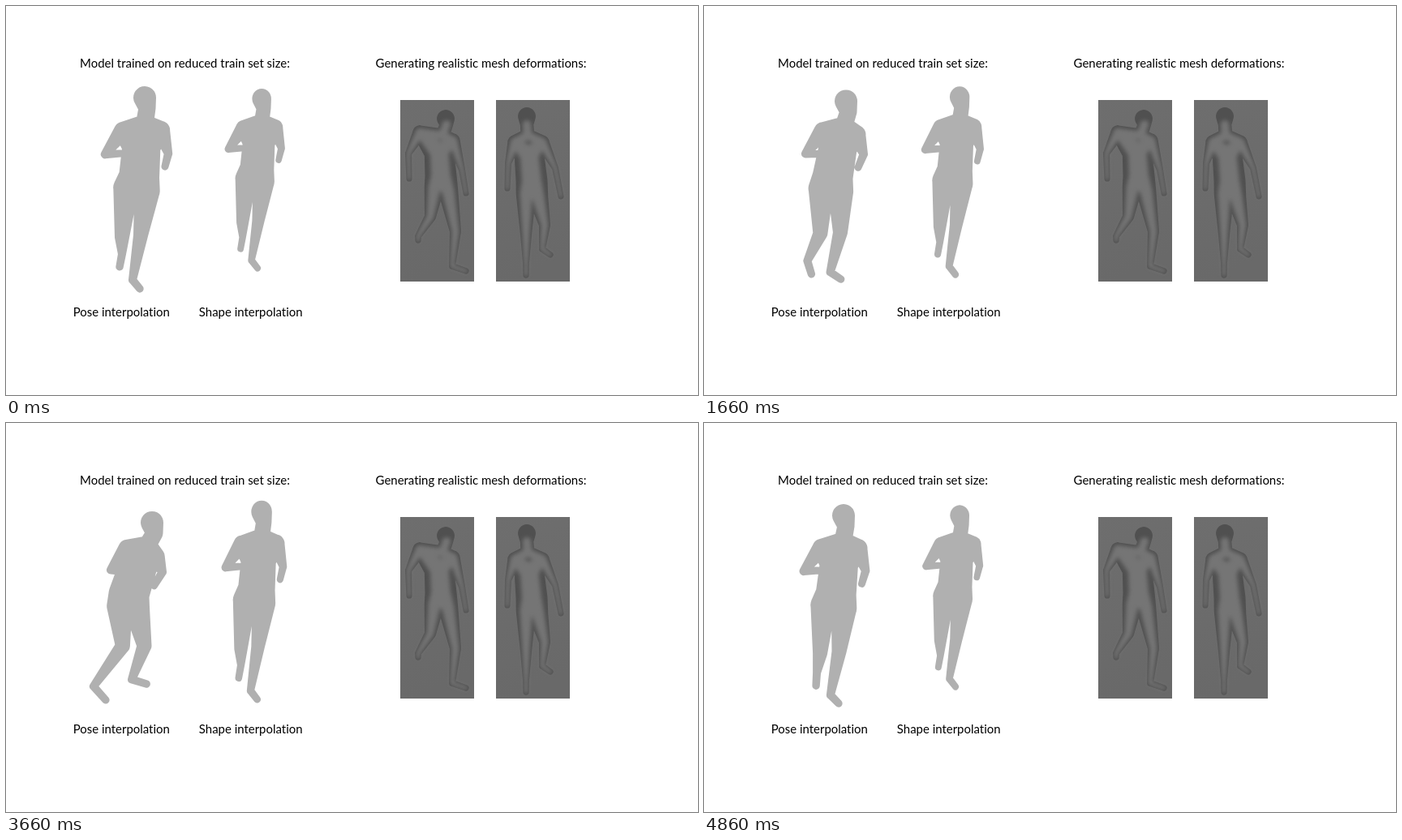
Recreate the animation shown at these times as an HTML page. Size 853 px wide and 480 px high, loop 5060 ms.

```html
<!DOCTYPE html>
<html lang="en">
<head>
<meta charset="utf-8">
<title>Mesh interpolation</title>
<style>
html, body { margin: 0; width: 100%; height: 100%; overflow: hidden; background: #fff; }
svg { display: block; width: 100vw; height: 100vh; }
text { font: 14.95px Lato, sans-serif; font-variant-ligatures: none; text-anchor: middle; }
.runner { fill: #b0b0b0; }
.skin { fill: #505050; }
.light { fill: #7c7c7c; opacity: 0.85; filter: url(#soft); }
</style>
</head>
<body>
<svg viewBox="0 0 853 480">
  <defs>
    <linearGradient id="wall" x2="0.2" y2="1">
      <stop offset="0" stop-color="#6e6e6e"/>
      <stop offset="1" stop-color="#696969"/>
    </linearGradient>
    <filter id="soft"><feGaussianBlur stdDeviation="2.5"/></filter>
  </defs>

  <text x="220.5" y="76">Model trained on reduced train set size:</text>
  <text x="585.5" y="76">Generating realistic mesh deformations:</text>
  <text x="142.3" y="383">Pose interpolation</text>
  <text x="301.7" y="383">Shape interpolation</text>

  <path id="pose" class="runner"/>
  <path id="shape" class="runner"/>

  <rect x="486" y="116" width="91" height="224" fill="url(#wall)"/>
  <path id="stepSkin" class="skin"/>
  <path id="stepLight" class="light"/>

  <rect x="604" y="116" width="91" height="224" fill="url(#wall)"/>
  <path id="leanSkin" class="skin"/>
  <path id="leanLight" class="light"/>
</svg>
<script>
// One body rig serves all four figures: joints with radii, joined by tapered limbs.
const radius = {
  crown: 14, chin: 10.5, neck: 11, chest: 23.5, belly: 25,
  shoulder: 11, elbow: 5.2, hand: 4.5, hip: 15.7, knee: 9, ankle: 5, toe: 4.7
};
const trunk = ['chin neck', 'chest belly'];
const head = ['crown chin'];
for (const s of 'LR') {
  trunk.push(`neck shoulder${s}`, `shoulder${s} chest`, `belly hip${s}`,
    `shoulder${s} elbow${s}`, `elbow${s} hand${s}`,
    `hip${s} knee${s}`, `knee${s} ankle${s}`, `ankle${s} toe${s}`);
}

const running = {
  crown: [171, 113], chin: [174, 126], neck: [171, 145], chest: [167, 172], belly: [164, 212],
  shoulderL: [144, 154], elbowL: [122, 183], handL: [141, 182],
  shoulderR: [191, 153], elbowR: [200, 182], handR: [196, 198],
  hipL: [148, 224], kneeL: [143, 285], ankleL: [143, 306], toeL: [140, 322],
  hipR: [174, 228], kneeR: [166, 283], ankleR: [156, 338], toeR: [165, 349]
};
const crouching = {
  crown: [181, 124], chin: [184, 137], neck: [175, 151], chest: [163, 175], belly: [150, 212],
  shoulderL: [150, 155], elbowL: [130, 181], handL: [140, 183],
  shoulderR: [184, 166], elbowR: [192, 184], handR: [181, 201],
  hipL: [139, 226], kneeL: [144, 274], ankleL: [104, 327], toeL: [121, 344],
  hipR: [160, 230], kneeR: [171, 274], ankleR: [155, 314], toeR: [174, 319]
};
const stepping = {
  crown: [542, 139], chin: [543, 146], neck: [538, 160], chest: [534, 180], belly: [536, 210],
  shoulderL: [510, 156], elbowL: [496, 182], handL: [497, 213],
  shoulderR: [551, 166], elbowR: [562, 202], handR: [567, 231],
  hipL: [528, 224], kneeL: [523, 260], ankleL: [508, 284], toeL: [508, 289],
  hipR: [545, 228], kneeR: [554, 278], ankleR: [550, 321], toeR: [567, 327]
};
const leaning = {
  crown: [642, 136], chin: [642, 146], neck: [643, 160], chest: [645, 184], belly: [648, 216],
  shoulderL: [627, 168], elbowL: [619, 194], handL: [618, 225],
  shoulderR: [661, 168], elbowR: [677, 200], handR: [684, 235],
  hipL: [641, 232], kneeL: [641, 282], ankleL: [641, 318], toeL: [641, 332],
  hipR: [656, 236], kneeR: [664, 270], ankleR: [661, 300], toeR: [671, 307]
};

const mix = (a, b, u) => a + (b - a) * u;
const setPath = (id, d) => document.getElementById(id).setAttribute('d', d);

// Outline around two circles, the outer tangents joining them.
function limb([x1, y1], r1, [x2, y2], r2) {
  const dir = Math.atan2(y2 - y1, x2 - x1);
  const taper = (r1 - r2) / Math.hypot(x2 - x1, y2 - y1);
  const spread = Math.acos(Math.max(-0.99, Math.min(0.99, taper)));
  const rim = (x, y, r, a) => `${(x + r * Math.cos(a)).toFixed(2)} ${(y + r * Math.sin(a)).toFixed(2)}`;
  const wide = spread < Math.PI / 2 ? 1 : 0;
  return `M${rim(x1, y1, r1, dir + spread)}`
    + `A${r1} ${r1} 0 ${wide} 1 ${rim(x1, y1, r1, dir - spread)}`
    + `L${rim(x2, y2, r2, dir - spread)}`
    + `A${r2} ${r2} 0 ${1 - wide} 1 ${rim(x2, y2, r2, dir + spread)}Z`;
}

function body(joints, bones, scale = 1) {
  const size = name => radius[name.replace(/[LR]$/, '')] * scale;
  return bones.map(bone => {
    const [a, b] = bone.split(' ');
    return limb(joints[a], size(a), joints[b], size(b));
  }).join('');
}

const blend = (from, to, u) => Object.fromEntries(Object.keys(from).map(
  name => [name, from[name].map((v, i) => mix(v, to[name][i], u))]));

const everyBone = [...head, ...trunk];
const MESH = 0.78, CORE = 0.48;
for (const [name, joints] of [['step', stepping], ['lean', leaning]]) {
  setPath(name + 'Skin', body(joints, everyBone, MESH));
  setPath(name + 'Light', body(joints, trunk, CORE));
}
setPath('shape', body(running, everyBone));
const shape = document.getElementById('shape');

const LOOP = 5060, FIRST = 260, STEP = 200, CYCLE = 22, SPAN = 20;

function draw(time) {
  const t = time % LOOP;
  const tick = t < FIRST ? 0 : 1 + Math.floor((t - FIRST) / STEP);
  const u = tick % CYCLE / SPAN;
  setPath('pose', body(blend(running, crouching, u), everyBone));
  // The second runner keeps its pose and only grows.
  const grow = `scale(${mix(0.84, 0.92, u)} ${mix(0.886, 0.992, u)})`;
  shape.setAttribute('transform', `translate(316 ${mix(102, 95, u)}) ${grow} translate(-172 -99)`);
}

function frame() {
  draw(performance.now());
  requestAnimationFrame(frame);
}
frame();
</script>
</body>
</html>
```
